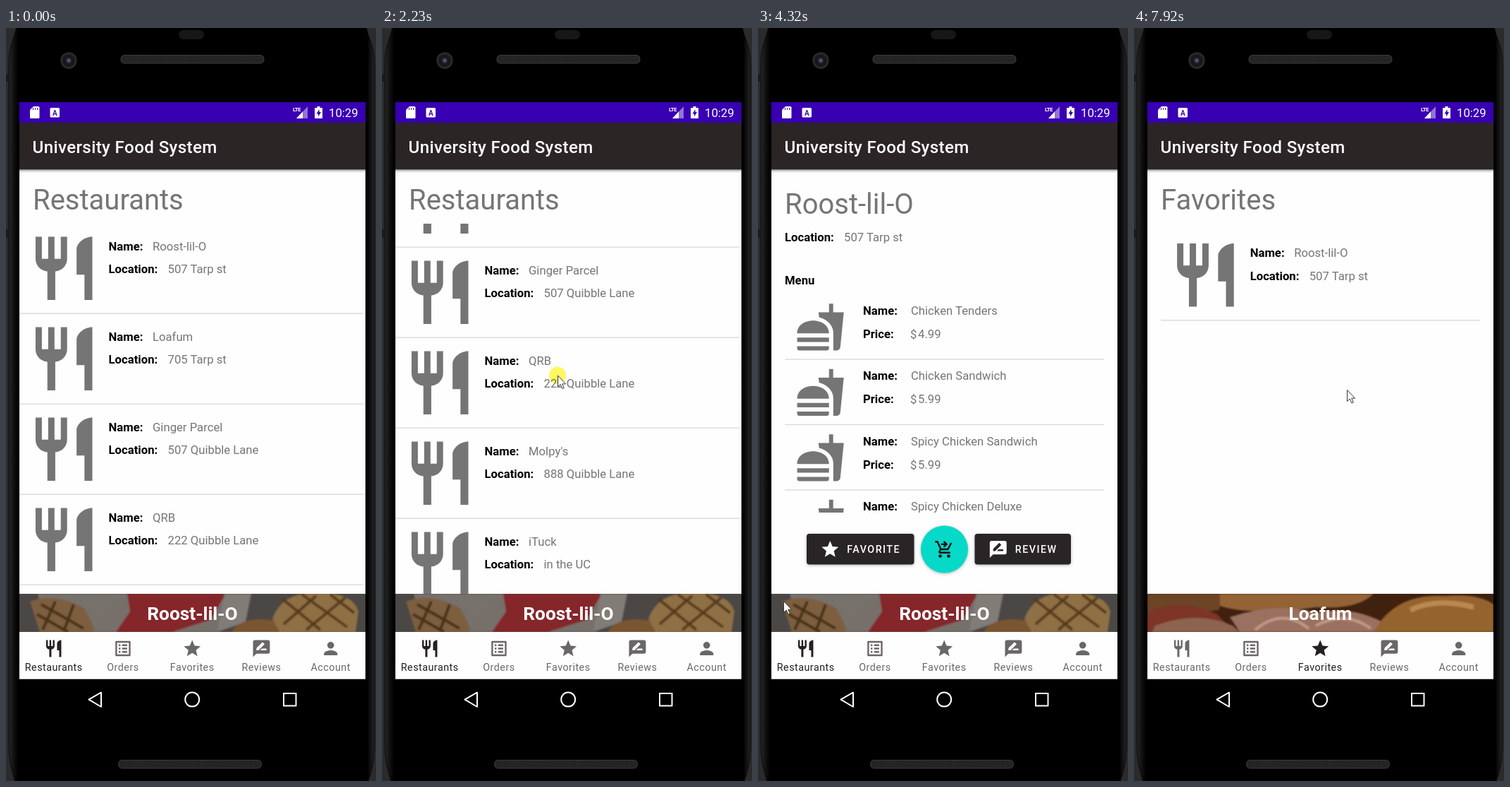
These frames come from a looping animation (525x1066 px, 8 s). An HTML page:

```html
<!DOCTYPE html>
<html lang="en">
<head>
<meta charset="utf-8">
<title>University Food System</title>
<style>
html, body { margin: 0; width: 100%; height: 100%; overflow: hidden; background: #000; }
svg { display: block; width: 100%; height: 100%; }
text { font: 16.7px Roboto, Arial, sans-serif; fill: #757575; white-space: pre; }
.b { font-weight: 700; fill: #000; }
.h { font-size: 40px; }
.bar { font-size: 24.2px; font-weight: 500; letter-spacing: .35px; fill: #fff; }
.btn { font-size: 14.3px; font-weight: 500; letter-spacing: 1.45px; fill: #fff; }
.tab text { font-size: 14.3px; letter-spacing: .5px; text-anchor: middle; fill: inherit; }
.tab { fill: #6b6767; }
.promo { font-size: 26.3px; font-weight: 700; text-anchor: middle; fill: #fff; }
.shade { filter: drop-shadow(0 1.5px 2px rgba(0,0,0,.3)); }

/* one shared 8 s clock; 1% = 80 ms */
.list, .detail, .saved, .fav, .unfav, .adA, .adB, .on, .off, #press { animation: 8s step-end infinite; }
.list { animation-name: list; }
.detail { animation-name: detail; }
.saved { animation-name: saved; }
.fav { animation-name: fav; }
.unfav { animation-name: unfav; }
.adA { animation-name: adA; }
.adB { animation-name: adB; }
.on { animation-name: tabOff; }
.off { animation-name: tabOn; }
#press { animation-name: press; mix-blend-mode: multiply; }
#rows { animation: scroll 8s linear infinite; }
#cursor { animation: move 8s linear infinite, show 8s step-end infinite; }
#toast { animation: toast 8s linear infinite; }
#glow { animation: glow 8s linear infinite; }
#ripple { animation: ripple 8s linear infinite; }

@keyframes list { 0% { visibility: visible } 44.5%, to { visibility: hidden } }
@keyframes detail { 0% { visibility: hidden } 44.5% { visibility: visible } 92.375%, to { visibility: hidden } }
@keyframes saved { 0% { visibility: hidden } 92.375%, to { visibility: visible } }
@keyframes fav { 0% { opacity: 1 } 67.75%, to { opacity: 0 } }
@keyframes unfav { 0% { opacity: 0 } 67.75%, to { opacity: 1 } }
@keyframes adA { 0% { opacity: 1 } 71.75%, to { opacity: 0 } }
@keyframes adB { 0% { opacity: 0 } 71.75%, to { opacity: 1 } }
@keyframes tabOff { 0% { fill: #241f20 } 92.375%, to { fill: #6b6767 } }
@keyframes tabOn { 0% { fill: #6b6767 } 92.375%, to { fill: #241f20 } }
@keyframes show { 0% { visibility: hidden } 18.25%, to { visibility: visible } }
@keyframes press {
  0% { opacity: 0 } 19.25% { opacity: 1 } 26.875% { opacity: 0 }
  27.875% { opacity: 1 } 34.625% { opacity: 0 }
  66.75% { opacity: 1 } 67.75% { opacity: 0 }
  91.375% { opacity: 1 } 92.375%, to { opacity: 0 }
}
@keyframes scroll {
  0%, 18.25% { transform: translateY(0) }
  19.25% { transform: translateY(-16px) }
  20.25% { transform: translateY(-52px) }
  21.125% { transform: translateY(-94px) }
  22.125% { transform: translateY(-144px) }
  23.125% { transform: translateY(-186px) }
  23.875% { transform: translateY(-206px) }
  25%, 29.75% { transform: translateY(-222px) }
  30.75% { transform: translateY(-217px) }
  31.75% { transform: translateY(-200px) }
  32.75% { transform: translateY(-157px) }
  33.75% { transform: translateY(-103px) }
  34.625% { transform: translateY(-58px) }
  35.625% { transform: translateY(-18px) }
  36.625%, to { transform: translateY(0) }
}
@keyframes move {
  0%, 18.25% { transform: translate(240px, 716px) }
  19.25% { transform: translate(241px, 694px) }
  20.25% { transform: translate(242px, 658px) }
  21.125% { transform: translate(243px, 616px) }
  22.125% { transform: translate(244px, 566px) }
  23.125% { transform: translate(245px, 524px) }
  23.875% { transform: translate(246px, 504px) }
  25%, 26.875% { transform: translate(248px, 489px) }
  28.875% { transform: translate(250px, 494px) }
  30.75% { transform: translate(250px, 508px) }
  31.75% { transform: translate(250.5px, 525px) }
  32.75% { transform: translate(251px, 568px) }
  33.75% { transform: translate(252px, 622px) }
  34.625% { transform: translate(252px, 655px) }
  35.625%, 36.7% { transform: translate(252px, 660px) }
  37.625% { transform: translate(254px, 560px) }
  38.625% { transform: translate(256px, 390px) }
  39.5%, 40.6% { transform: translate(253px, 281px) }
  41.5% { transform: translate(253px, 290px) }
  42.5%, 48.4% { transform: translate(253px, 298px) }
  49.25% { transform: translate(240px, 340px) }
  51.125% { transform: translate(150px, 560px) }
  53.125% { transform: translate(55px, 778px) }
  54%, 54.6% { transform: translate(36px, 811px) }
  56% { transform: translate(330px, 832px) }
  56.875% { transform: translate(514px, 826px) }
  57.875% { transform: translate(320px, 782px) }
  58.875% { transform: translate(174px, 746px) }
  59.875% { transform: translate(166px, 742px) }
  60.875%, 66.75% { transform: translate(164.5px, 744px) }
  68.75% { transform: translate(173px, 768px) }
  74.75%, 75.7% { transform: translate(195px, 794px) }
  76.625% { transform: translate(202px, 797px) }
  79.5% { transform: translate(292px, 830px) }
  81.5% { transform: translate(334px, 866px) }
  84.5%, 85.5% { transform: translate(271px, 887px) }
  86.375% { transform: translate(270px, 891px) }
  87.5%, 93.25% { transform: translate(268px, 897px) }
  95.25% { transform: translate(280px, 760px) }
  97% { transform: translate(293px, 610px) }
  99%, to { transform: translate(302px, 512px) }
}
@keyframes toast {
  0%, 67.25% { opacity: 0 } 68.75% { opacity: .36 } 71.25%, 93.25% { opacity: 1 } 96.25%, to { opacity: 0 }
}
@keyframes glow {
  0%, 66.25% { opacity: 0 } 67.75%, 69.75% { opacity: .22 } 74.75%, to { opacity: 0 }
}
@keyframes ripple {
  0%, 91% { opacity: 0; r: 8px } 92.5% { opacity: .14; r: 20px } 96%, to { opacity: 0; r: 32px }
}
</style>
</head>
<body>
<svg viewBox="0 0 525 1066">
  <defs>
    <clipPath id="listClip"><rect x="19" y="277" width="491" height="524"/></clipPath>
    <clipPath id="menuClip"><rect x="19" y="380" width="491" height="306"/></clipPath>
    <clipPath id="adClip"><rect x="19" y="801" width="491" height="54"/></clipPath>
    <linearGradient id="drop" x2="0" y2="1">
      <stop stop-color="#000" stop-opacity=".32"/><stop offset="1" stop-color="#000" stop-opacity="0"/>
    </linearGradient>
    <linearGradient id="shell">
      <stop stop-color="#262626"/><stop offset=".025"/>
      <stop offset=".98"/><stop offset="1" stop-color="#262626"/>
    </linearGradient>
    <pattern id="mesh" width="4" height="4" patternUnits="userSpaceOnUse">
      <rect width="4" height="4" fill="#292929"/><path d="M0 4L4 0" stroke="#161616"/>
    </pattern>
    <radialGradient id="lens">
      <stop stop-color="#85839f"/><stop offset=".2" stop-color="#37364f"/>
      <stop offset=".45" stop-color="#15151a"/><stop offset=".75" stop-color="#1c1c1e"/>
      <stop offset="1" stop-color="#383838"/>
    </radialGradient>
    <filter id="soft"><feGaussianBlur stdDeviation="1.2"/></filter>
  </defs>

  <!-- phone body -->
  <rect width="525" height="1066" fill="#2b2b2b"/>
  <path d="M15 -2C11 17 4 26 4 52V1014C4 1040 9 1052 13 1068H514C518 1052 523 1040 523 1014V52C523 26 515 17 511 -2z"
    fill="url(#shell)" stroke="#0a0a0a"/>
  <path d="M0 65h4v11H0zM0 285h4v12H0z" fill="#1a1a1a"/>
  <rect x="245" y="3" width="36" height="13" rx="6.5" fill="#171717"/>
  <g fill="url(#mesh)" stroke="#3c3c3c">
    <rect x="163" y="38.5" width="203" height="11.5" rx="5"/>
    <rect x="159.5" y="1036.5" width="203" height="11.5" rx="5"/>
  </g>
  <circle cx="89" cy="46" r="11.5" fill="url(#lens)"/>

  <!-- screen -->
  <rect x="19" y="105" width="491" height="816.5" fill="#fefefe"/>
  <rect x="19" y="200.5" width="491" height="4.5" fill="url(#drop)"/>
  <rect x="19" y="105" width="491" height="29" fill="#3800b2"/>
  <rect x="19" y="134" width="491" height="66.5" fill="#2c2526"/>
  <text class="bar" x="37.5" y="176.5">University Food System</text>
  <g fill="#fff">
    <path d="M39 111h7q1.5 0 1.5 1.5v14q0 1.5-1.5 1.5H35.5q-1.5 0-1.5-1.5V116z"/>
    <rect x="62.5" y="113" width="13.5" height="13.5" rx="1.5"/>
    <path d="M412 128L428 111V128z" opacity=".45"/>
    <path d="M412 128L421 118.5V128z"/>
    <path d="M441.5 111h4v2h3.5v15h-11v-15h3.5z"/>
  </g>
  <path d="M38.5 113v3M41.5 113v3M44.5 113v3" stroke="#3800b2"/>
  <path d="M444.5 115l-4 6.5h2.5v4l4-6.5h-2.5z" fill="#3800b2"/>
  <text x="69.25" y="123.5" text-anchor="middle" style="font-size:10px;font-weight:700;fill:#3800b2">A</text>
  <text x="407" y="118" style="font-size:8px;font-weight:700;fill:#fff;letter-spacing:-.8px">LTE</text>
  <text x="458" y="126" style="fill:#fff">10:29</text>

  <!-- pages -->
  <g class="list">
    <text class="h" x="38" y="256.5">Restaurants</text>
    <g clip-path="url(#listClip)"><g id="rows"></g></g>
  </g>
  <g class="detail">
    <text class="h shopName" x="38" y="263"></text>
    <text class="b" x="38" y="302">Location:</text>
    <text class="shopPlace" x="122" y="302"></text>
    <text class="b" x="38" y="363">Menu</text>
    <g id="menu" clip-path="url(#menuClip)"></g>
    <g id="actions"></g>
  </g>
  <g class="saved">
    <text class="h" x="38" y="256.5">Favorites</text>
    <g id="savedRow"></g>
  </g>

  <!-- promo strip -->
  <g clip-path="url(#adClip)">
    <g class="adA">
      <rect x="19" y="801" width="491" height="54" fill="#4b4744"/>
      <g filter="url(#soft)">
        <path d="M45 801H165L140 838 120 855H60z" fill="#77716c"/>
        <path d="M34 812Q70 798 112 822L128 855H48z" fill="#7d5f41"/>
        <path d="M50 816l60 34M44 830l44 25M70 812l-18 40M96 816l-14 38" stroke="#493019" stroke-width="4"/>
        <path d="M122 855L165 801H320L300 855z" fill="#77706b"/>
        <path d="M172 801H312L290 838 236 855H156L176 826z" fill="#84262a"/>
        <path d="M310 801h38l-8 40-40 14z" fill="#827c77"/>
        <ellipse cx="362" cy="858" rx="42" ry="21" fill="#795430"/>
        <path d="M378 836Q392 798 440 800 492 798 500 826L496 855H388z" fill="#8f7045"/>
        <path d="M392 808l54 44M420 802l64 46M460 802l34 26M440 804l-46 40M482 806l-56 46" stroke="#593b1b" stroke-width="4"/>
      </g>
      <text class="promo shopName" x="264.5" y="838"></text>
    </g>
    <g class="adB">
      <rect x="19" y="801" width="491" height="54" fill="#40200f"/>
      <g filter="url(#soft)">
        <path d="M19 801H130L120 824 19 836z" fill="#6c4525"/>
        <path d="M19 826Q70 806 118 830L130 842 60 855H19z" fill="#7b3526"/>
        <path d="M30 846Q90 824 140 846L150 855H26z" fill="#8d6350"/>
        <path d="M122 801H340Q316 824 260 820 160 832 122 818z" fill="#936434"/>
        <path d="M136 834Q200 812 260 828 310 816 362 846L350 855H150z" fill="#9a7160"/>
        <path d="M172 852Q210 820 248 850M258 846Q300 824 336 850" fill="none" stroke="#c09a86" stroke-width="4"/>
        <path d="M340 855Q370 800 440 804 490 800 510 816V855z" fill="#95632f"/>
        <path d="M392 824Q430 806 482 820" fill="none" stroke="#b98a50" stroke-width="7"/>
      </g>
      <text class="promo" x="264.5" y="838">Loafum</text>
    </g>
  </g>

  <!-- tabs and system keys -->
  <rect x="19" y="855" width="491" height="66.5" fill="#fefefe"/>
  <circle id="ripple" cx="264" cy="888" r="8"/>
  <g id="tabs"></g>
  <g fill="none" stroke="#fff" stroke-width="2" stroke-linejoin="round">
    <path d="M117.5 950.7L135 940.7V961z"/>
    <circle cx="264.2" cy="950.6" r="10"/>
    <rect x="394" y="942" width="17.5" height="17.5"/>
  </g>

  <g id="toast">
    <rect x="158.5" y="793" width="212" height="52.5" rx="26" fill="#575757" fill-opacity=".93"/>
    <text x="188.5" y="826" style="fill:#f2f2f2">Restaurant favorited</text>
  </g>
  <g id="cursor">
    <circle id="press" r="12" fill="#fff85f"/>
    <path d="M.5 .5V16.5L4.2 13 6.9 19 9.3 18 6.7 12.2H11.6z" fill="#fff" stroke="#333" stroke-linejoin="round"/>
  </g>
</svg>
<script>
const icons = {
  dine: "M11 9H9V2H7v7H5V2H3v7c0 2.12 1.66 3.84 3.75 3.97V22h2.5v-9.03C11.34 12.84 13 11.12 13 9V2h-2zM16 6v8h2.5v8H21V2c-2.76 0-5 2.24-5 4z",
  meal: "M18.06 23h1.66c.84 0 1.53-.64 1.63-1.46L23 5.05h-5V1h-1.97v4.05h-4.97l.3 2.34c1.71.47 3.31 1.32 4.27 2.26 1.44 1.42 2.43 2.89 2.43 5.29zM1 22V21h15.03v1c0 .55-.45 1-1.01 1H2.01C1.45 23 1 22.55 1 22zM16.03 15C16.03 7 1 7 1 15zM1.02 17h15v2h-15z",
  orders: "M19 5v14H5V5h14m1.1-2H3.9c-.5 0-.9.4-.9.9v16.2c0 .4.4.9.9.9h16.2c.4 0 .9-.5.9-.9V3.9c0-.5-.5-.9-.9-.9zM11 7h6v2h-6zM11 11h6v2h-6zM11 15h6v2h-6zM7 7h2v2H7zM7 11h2v2H7zM7 15h2v2H7z",
  star: "M12 17.27L18.18 21l-1.64-7.03L22 9.24l-7.19-.61L12 2 9.19 8.63 2 9.24l5.46 4.73L5.82 21z",
  review: "M20 2H4C2.9 2 2 2.9 2 4V22l4-4h14c1.1 0 2-.9 2-2V4c0-1.1-.9-2-2-2zM6 14v-2.47l6.88-6.88c.2-.2.51-.2.71 0l1.77 1.77c.2.2.2.51 0 .71L8.47 14zm12 0h-7.5l2-2H18z",
  person: "M12 12c2.21 0 4-1.79 4-4s-1.79-4-4-4-4 1.79-4 4 1.79 4 4 4zm0 2c-2.67 0-8 1.34-8 4v2h16v-2c0-2.66-5.33-4-8-4z",
  cart: "M7 18a2 2 0 1 0 0 4 2 2 0 0 0 0-4zM17 18a2 2 0 1 0 0 4 2 2 0 0 0 0-4zM8.1 13h7.45c.75 0 1.41-.41 1.75-1.03L21 4.96 19.25 4l-3.7 7H8.53L4.27 2H1v2h2l3.6 7.59-1.35 2.44C4.52 15.37 5.48 17 7 17h12v-2H7zM12 2l4 4-4 4-1.41-1.41L12.17 7H8V5h4.17l-1.59-1.59z"
};
const shops = [
  ["Roost-lil-O", "507 Tarp st"], ["Loafum", "705 Tarp st"],
  ["Ginger Parcel", "507 Quibble Lane"], ["QRB", "222 Quibble Lane"],
  ["Molpy's", "888 Quibble Lane"], ["iTuck", "in the UC"]
];
const meals = [
  ["Chicken Tenders", "4.99"], ["Chicken Sandwich", "5.99"],
  ["Spicy Chicken Sandwich", "5.99"], ["Spicy Chicken Deluxe", "6.49"]
];

const icon = (name, x, y, scale, fill = "") =>
  `<path d="${icons[name]}" transform="translate(${x} ${y}) scale(${scale})" ${fill && `fill="${fill}"`}/>`;
const centred = (name, x, y, fill) => icon(name, x - 14.33, y - 14.33, 1.194, fill);
const text = (x, y, str, cls = "") => `<text class="${cls}" x="${x}" y="${y}">${str}</text>`;
const rule = (x1, x2, y) => `<path d="M${x1} ${y}H${x2}" stroke="#dcdcdc" stroke-width="1.4"/>`;
const fill = (id, html) => document.getElementById(id).innerHTML = html;

const shopRow = ([name, place], x, y, x1, x2) =>
  icon("dine", x, y + 9.5, 4.477, "#757575") +
  text(x + 117, y + 37.5, "Name:", "b") + text(x + 179.5, y + 37.5, name) +
  text(x + 117, y + 70.3, "Location:", "b") + text(x + 201, y + 70.3, place) +
  rule(x1, x2, y + 127.2);

const mealRow = ([name, price], i) => {
  const y = 92.5 * i;
  return icon("meal", 52.5, 387.2 + y, 3.01, "#757575") +
    text(149, 405.5 + y, "Name:", "b") + text(217, 405.5 + y, name) +
    text(149, 438.5 + y, "Price:", "b") + text(216, 438.5 + y, "$") + text(227, 438.5 + y, price) +
    rule(38, 491, 469 + y);
};

const button = (cls, x, right, name, label, glow = "") => {
  const box = `x="${x}" y="716" width="${right - x}" height="43.5" rx="4"`;
  return `<g class="${cls}"><rect class="shade" ${box} fill="#292425"/>` +
    (glow && `<rect id="${glow}" ${box} fill="#fff"/>`) +
    centred(name, x + 33.3, 738, "#fff") + text(x + 57.3, 743, label, "btn") + "</g>";
};

fill("rows", shops.map((s, i) => shopRow(s, 28.5, 277 + 128 * i, 19, 507)).join(""));
fill("menu", meals.map(mealRow).join(""));
fill("savedRow", shopRow(shops[0], 47.7, 286.5, 38, 491));
fill("actions",
  button("fav", 69, 221.5, "star", "FAVORITE") +
  button("unfav", 46.5, 221.5, "star", "UNFAVORITE", "glow") +
  button("", 307.5, 444, "review", "REVIEW") +
  `<circle class="shade" cx="264.5" cy="738" r="33.5" fill="#06d9c8"/>` +
  centred("cart", 264.5, 738, "#111"));
fill("tabs", [["dine", "Restaurants", "on"], ["orders", "Orders"], ["star", "Favorites", "off"],
  ["review", "Reviews"], ["person", "Account"]].map(([name, label, cls = ""], i) => {
    const x = 67.7 + 98.25 * i;
    return `<g class="tab ${cls}">${centred(name, x, 878.5)}${text(x, 910, label)}</g>`;
  }).join(""));

document.querySelectorAll(".shopName").forEach(el => el.textContent = shops[0][0]);
document.querySelector(".shopPlace").textContent = shops[0][1];
</script>
</body>
</html>
```
